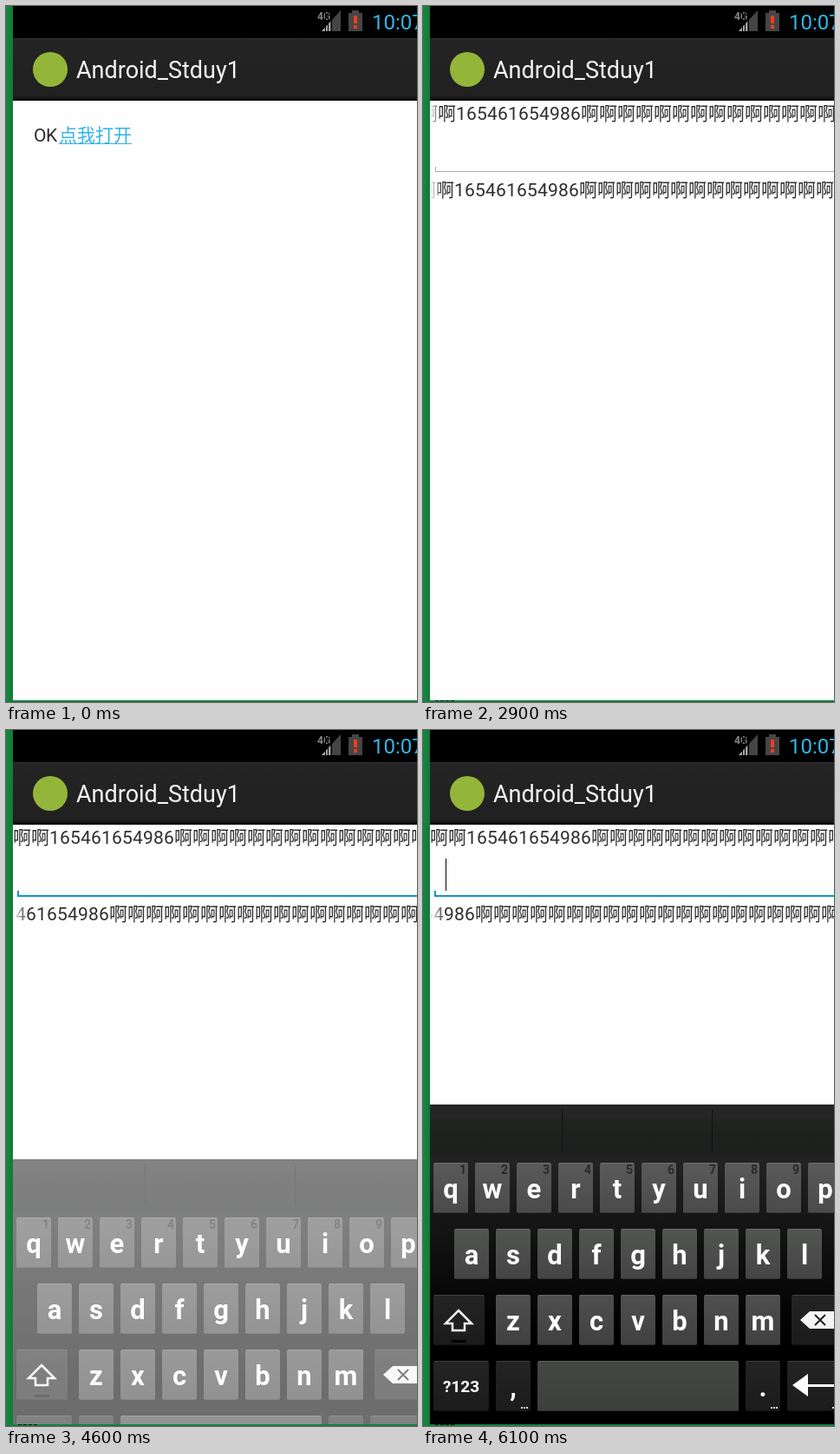
Recreate the animation shown at these times as an HTML page with a canvas. Size 474x801 px, loop 6.2 s.

```html
<!DOCTYPE html>
<html lang="zh">
<head>
<meta charset="utf-8">
<style>
html, body { margin: 0; width: 100%; height: 100%; overflow: hidden; }
canvas { display: block; }
</style>
</head>
<body>
<canvas id="stage" width="474" height="801"></canvas>
<script>
const W = 474, H = 801, LEFT = 8, BAR = 37, BODY = 109, BOTTOM = 799;
const LOOP = 6200, STEP = 100;
const FOCUS = 4300, KEYBOARD = 4600, CURSOR = 4800;
const BLUE = '#33b5e5', FONT = 'Roboto, "Noto Sans CJK SC", "Noto Sans CJK", sans-serif';
const LINE = '啊啊165461654986' + '啊'.repeat(24);
const stage = document.getElementById('stage').getContext('2d');

function layer() {
  const canvas = document.createElement('canvas');
  canvas.width = W;
  canvas.height = H;
  return canvas.getContext('2d');
}

function rect(c, x, y, w, h, fill) {
  c.fillStyle = fill;
  c.fillRect(x, y, w, h);
}

function text(c, str, x, y, size, fill, weight = 400, align = 'left') {
  c.font = `${weight} ${size}px ${FONT}`;
  c.fillStyle = fill;
  c.textAlign = align;
  c.fillText(str, x, y);
}

// Glyph advances are rounded to whole pixels, as on the device.
function snappedText(c, str, x, y, size, fill) {
  c.font = `${size}px ${FONT}`;
  for (const ch of str) {
    if (x > W) break;
    text(c, ch, x, y, size, fill);
    x += Math.round(c.measureText(ch).width);
  }
}

function poly(c, points, fill) {
  c.beginPath();
  points.forEach(([x, y]) => c.lineTo(x, y));
  c.closePath();
  c.fillStyle = fill;
  c.fill();
}

function vertical(c, y0, y1, ...colors) {
  const g = c.createLinearGradient(0, y0, 0, y1);
  colors.forEach((color, i) => g.addColorStop(i / (colors.length - 1), color));
  return g;
}

// Linear interpolation through [time, value] points.
function track(points, t) {
  if (t < points[0][0]) return 0;
  for (let i = 1; i < points.length; i++) {
    const [t0, v0] = points[i - 1], [t1, v1] = points[i];
    if (t <= t1) return v0 + (v1 - v0) * (t - t0) / (t1 - t0);
  }
  return points[points.length - 1][1];
}

const topScroll = t => t >= FOCUS ? 0 : track([[2600, 1], [2900, 12], [3700, 41], [4300, 63]], t);
const lowScroll = t => track([[2600, 3], [2900, 14], [3700, 44], [4600, 75], [5100, 97], [6100, 134]], t);

function windowFrame(c) {
  rect(c, LEFT, BAR, W, BOTTOM - BAR, '#fefefe');
  rect(c, LEFT, BAR, W, BODY - BAR, vertical(c, BAR, BODY, '#252525', '#222', '#202020'));
  rect(c, LEFT, BAR, W, 1, '#303030');
  rect(c, LEFT, 104, W, 5, vertical(c, 104, 109, '#1c1c1c', '#0c0c0c'));
  c.beginPath();
  c.arc(51, 73, 20, 0, 2 * Math.PI);
  c.fillStyle = '#93b63a';
  c.fill();
  text(c, 'Android_Stduy1', 81, 83, 27, '#f6f6f6');
}

function linkPage(c, pressed) {
  windowFrame(c);
  if (pressed) rect(c, 61, 136, 84, 25, 'rgba(51,181,229,.4)');
  snappedText(c, 'OK', 32, 156, 21, '#2b2b2b');
  snappedText(c, '点我打开', 61, 156, 21, BLUE);
  rect(c, 61, 158, 84, 1, BLUE);
}

function marquee(c, baseline, offset) {
  c.save();
  c.beginPath();
  c.rect(LEFT, baseline - 20, W, 28);
  c.clip();
  snappedText(c, LINE, LEFT - Math.round(offset), baseline, 21, '#2e2e2e');
  const fade = Math.min(18, offset);
  if (fade > 0) {
    const g = c.createLinearGradient(LEFT, 0, LEFT + fade, 0);
    g.addColorStop(0, 'rgba(254,254,254,1)');
    g.addColorStop(1, 'rgba(254,254,254,0)');
    rect(c, LEFT, baseline - 20, fade, 28, g);
  }
  c.restore();
}

function marqueePage(c, t) {
  windowFrame(c);
  marquee(c, 131, topScroll(t));
  marquee(c, 219, lowScroll(t));
  if (t >= FOCUS) {
    rect(c, 13, 190, W, 2, '#1295cb');
    rect(c, 13, 185, 2, 6, '#1295cb');
  } else {
    rect(c, 14, 190, W, 1, '#a9a9a9');
    rect(c, 14, 185, 1, 5, '#a9a9a9');
  }
  if (t >= CURSOR && (t - CURSOR) % 1000 < 500) rect(c, 26, 148, 1, 37, '#000');
}

function key(c, x, y, w, top, bottom) {
  c.beginPath();
  c.roundRect(x, y, w, 58, 2);
  c.fillStyle = vertical(c, y, y + 58, top, bottom);
  c.fill();
  rect(c, x + 1, y, w - 2, 1, 'rgba(255,255,255,.12)');
  rect(c, x + 1, y + 57, w - 2, 1, 'rgba(0,0,0,.25)');
}

const darkKey = (c, x, y, w) => key(c, x, y, w, '#242424', '#1b1b1b');

function letterRow(c, letters, x, y, top, bottom) {
  [...letters].forEach((ch, i) => {
    const kx = x + 48 * i;
    key(c, kx, y, 40, top, bottom);
    text(c, ch, kx + 20, y + 41, 31, '#fff', 700, 'center');
  });
}

function drawKeyboard(c) {
  rect(c, LEFT, 431, W, 61, vertical(c, 431, 492, '#262827', '#1f211f', '#1d1f1e'));
  rect(c, LEFT, 431, W, 16, '#252525');
  for (const x of [160, 333]) rect(c, x, 437, 1, 48, '#121212');
  rect(c, LEFT, 492, W, BOTTOM - 492, vertical(c, 492, BOTTOM, '#232323', '#0f100f', '#000', '#000'));

  letterRow(c, 'qwertyuiop', 12, 498, '#5b5a5b', '#4b4a4b');
  [...'123456789'].forEach((n, i) => text(c, n, 50 + 48 * i, 511, 14, '#2a2a2a', 700, 'right'));
  letterRow(c, 'asdfghjkl', 36, 574, '#535553', '#434443');
  letterRow(c, 'zxcvbnm', 84, 650, '#4f4f4f', '#404040');

  darkKey(c, 12, 650, 59);
  c.beginPath();
  [[41, 668], [56, 683], [48, 683], [48, 691], [34, 691], [34, 683], [26, 683]]
    .forEach(([x, y]) => c.lineTo(x, y));
  c.closePath();
  c.strokeStyle = '#f4f4f4';
  c.lineWidth = 2.5;
  c.stroke();
  rect(c, 33, 702, 17, 3, '#000');

  darkKey(c, 425, 650, 62);
  poly(c, [[435, 679], [446, 669], [490, 669], [490, 689], [446, 689]], '#f4f4f4');
  c.beginPath();
  c.moveTo(452, 673); c.lineTo(464, 685);
  c.moveTo(464, 673); c.lineTo(452, 685);
  c.strokeStyle = '#222';
  c.lineWidth = 2;
  c.stroke();

  darkKey(c, 12, 726, 64);
  text(c, '?123', 44, 762, 19, '#fff', 700, 'center');
  for (const [ch, x] of [[',', 84], ['.', 372]]) {
    darkKey(c, x, 726, 40);
    text(c, ch, x + 20, 767, 31, '#fff', 700, 'center');
  }
  key(c, 132, 726, 232, '#454745', '#3d3f3d');
  darkKey(c, 420, 726, 66);
  poly(c, [[426, 754], [444, 741], [444, 767]], '#fff');
  rect(c, 443, 753, 40, 3, '#fff');
  for (const x of [113, 401, 472])
    for (let i = 0; i < 3; i++) rect(c, x + 3 * i, 779, 2, 2, '#ddd');
}

function statusBar(c) {
  rect(c, LEFT, 0, W, BAR, '#000');
  text(c, '4G', 359, 16, 12, '#858585', 700);
  poly(c, [[364, 29], [386, 5], [386, 29]], '#454545');
  poly(c, [[364, 29], [374, 18], [374, 29]], '#a6a6a6');
  for (const x of [368, 371, 375]) rect(c, x, 5, 1, 24, '#000');
  rect(c, 399, 5, 8, 3, '#454545');
  rect(c, 395, 8, 16, 21, '#454545');
  rect(c, 401, 11, 4, 9, '#f23c20');
  rect(c, 401, 22, 4, 4, '#f23c20');
  text(c, '10:07', 422, 27, 24, BLUE);
}

const keyboard = layer();
drawKeyboard(keyboard);
const incoming = layer();

function openTransition(c, t) {
  const p = 1 - (1 - (t - 1650) / 350) ** 3;
  linkPage(c, false);
  rect(c, LEFT, BAR, W, BOTTOM - BAR, `rgba(0,0,0,${0.3 * p})`);
  incoming.clearRect(0, 0, W, H);
  marqueePage(incoming, t);
  const scale = 0.8 + 0.2 * p;
  c.save();
  c.globalAlpha = p;
  c.translate(248, 400);
  c.scale(scale, scale);
  c.translate(-248, -400);
  c.drawImage(incoming.canvas, 0, 0);
  c.restore();
}

function showKeyboard(c, t) {
  const remaining = Math.max(0, 1 - (t - KEYBOARD) / 200);
  c.save();
  c.beginPath();
  c.rect(LEFT, BAR, W, BOTTOM - BAR);
  c.clip();
  c.globalAlpha = 1 - 0.43 * remaining;
  c.drawImage(keyboard.canvas, 0, Math.round(63 * remaining ** 1.5));
  c.restore();
}

function border(c) {
  const g = c.createLinearGradient(0, 0, LEFT, 0);
  g.addColorStop(0, '#15883f');
  g.addColorStop(1, '#127a3b');
  rect(c, 0, 0, LEFT, H, g);
  rect(c, 0, BOTTOM, W, H - BOTTOM, '#158040');
}

function draw(t) {
  const c = stage;
  if (t < 1700) linkPage(c, t >= 1200);
  else if (t < 2000) openTransition(c, t);
  else marqueePage(c, t);
  if (t >= KEYBOARD) showKeyboard(c, t);
  statusBar(c);
  border(c);
  if (t >= 2000) for (let x = 14; x < 38; x += 6) rect(c, x, 799, 4, 1, '#0a1a10');
}

const start = performance.now();
function tick() {
  const t = (performance.now() - start) % LOOP;
  draw(Math.floor(t / STEP) * STEP);
  requestAnimationFrame(tick);
}
tick();
</script>
</body>
</html>
```
